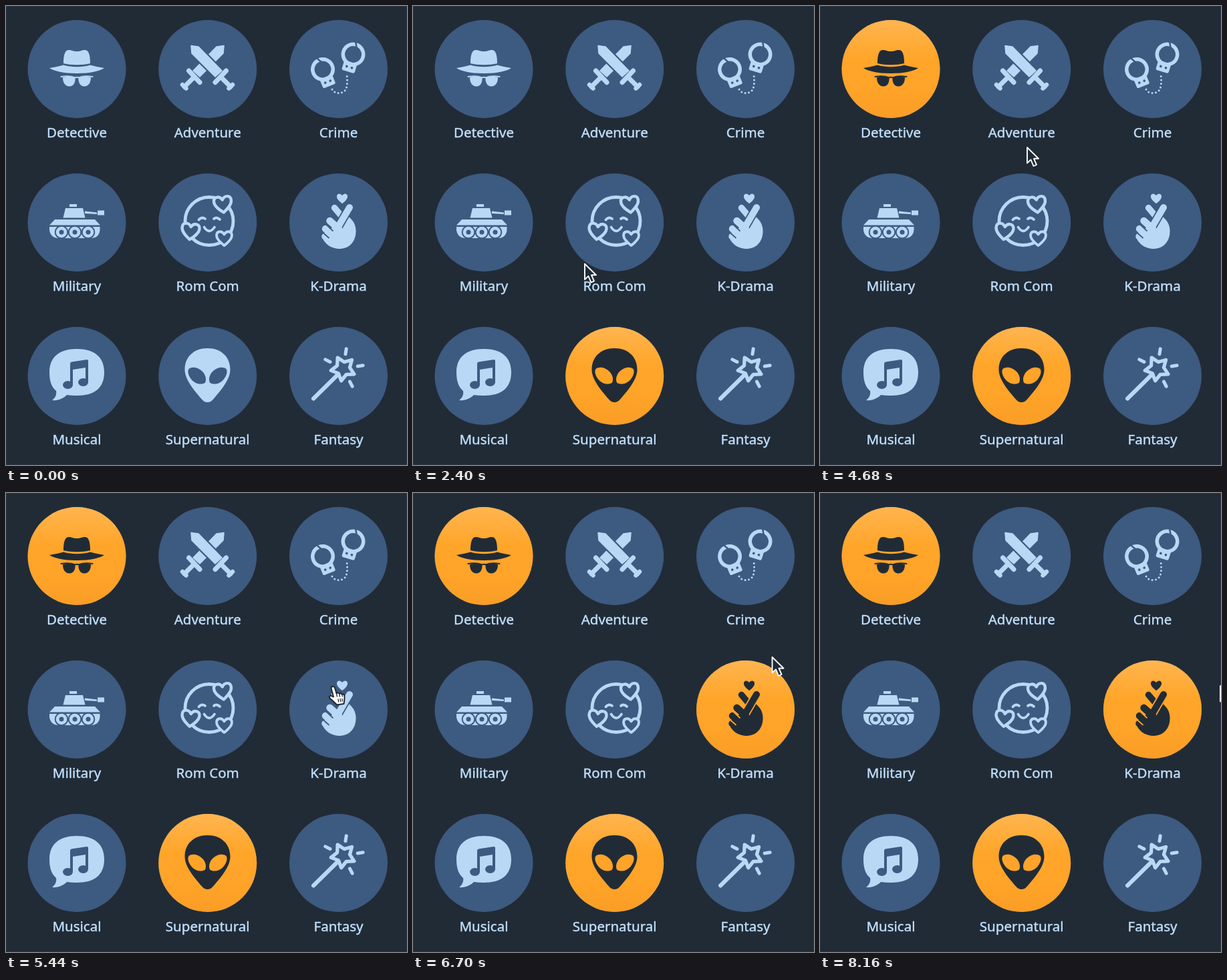
Recreate the animation shown at these times as an HTML page. Size 600 by 688 pixels, loop 8340 ms.

```html
<!DOCTYPE html>
<html lang="en">
<head>
<meta charset="utf-8">
<title>Genre picker</title>
<style>
  html, body { margin: 0; width: 100%; height: 100%; overflow: hidden; background: #212b36; }
  svg { display: block; }
  text { font: 20.5px "Noto Sans", "Open Sans", sans-serif; fill: #c1e0fd; stroke: #c1e0fd; stroke-width: .4; text-anchor: middle; }
  .idle { color: #b9d8f5; --gap: #3d5a80; }
  .picked { color: #212b36; --gap: #ffa428; }
  .ink { fill: currentColor; }
  .gap { fill: var(--gap); }
  .line { fill: none; stroke: currentColor; stroke-linecap: round; stroke-linejoin: round; }
  .cut { fill: none; stroke: var(--gap); stroke-linecap: round; stroke-linejoin: round; }
</style>
</head>
<body>
<svg id="stage" width="600" height="688" viewBox="0 0 600 688">
  <defs>
    <linearGradient id="amber" x2="0" y2="1">
      <stop offset="0" stop-color="#ffb54f"/>
      <stop offset=".4" stop-color="#ffa529"/>
      <stop offset=".7" stop-color="#ffa428"/>
      <stop offset="1" stop-color="#f99d26"/>
    </linearGradient>
    <path id="heart" d="M0 12 C-5 8 -13 2 -13 -5 C-13 -13 -4 -14 0 -7 C4 -14 13 -13 13 -5 C13 2 5 8 0 12Z"/>

    <g id="detective" class="ink">
      <path d="M86 86 C86 77 87 67 93 66 C98 65.500 100 68 106 68 C112 68 114 65.500 119 66 C125 67 126 77 126 86 C114 89 98 89 86 86Z"/>
      <path d="M65 93 C72 91.500 80 90.500 86 88.500 C98 92 114 92 126 88.500 C132 90.500 140 91.500 147 93 C140 97.500 126 101 106 101 C86 101 72 97.500 65 93Z"/>
      <path d="M85 107 C90 105.500 98 105.500 103.500 108 C104 115 100.500 120.500 95 120.500 C88.500 120.500 85 115 85 107Z"/>
      <path d="M127 107 C122 105.500 114 105.500 108.500 108 C108 115 111.500 120.500 117 120.500 C123.500 120.500 127 115 127 107Z"/>
      <path class="line" stroke-width="2" d="M82.500 106 Q95 104 103.500 107.500 Q106 106 108.500 107.500 Q117 104 129.500 106"/>
    </g>

    <g id="sword">
      <path d="M277 59.5 L288 61 L323 97 L313 106 L278 71Z" class="ink line" style="fill:currentColor" stroke-width="1.500"/>
      <path class="line" stroke-width="7" d="M329.5 97 L313 114.5 M321 106 L336 121"/>
      <path class="line" stroke-width="6.5" d="M339 118 L333.5 123.5"/>
    </g>
    <g id="adventure">
      <use href="#sword" transform="matrix(-1 0 0 1 603 0)"/>
      <path class="cut" stroke-width="6" d="M277 59.5 L288 61 L323 97 L313 106 L278 71Z"/>
      <use href="#sword"/>
    </g>

    <g id="cuff">
      <circle class="line" r="15.200" stroke-width="5.500"/>
      <rect class="ink" x="-10" y="12" width="20" height="15" rx="2.5"/>
      <circle class="gap" cx="-4" cy="20" r="1.8"/>
      <circle class="gap" cx="4" cy="20" r="1.8"/>
      <path class="cut" stroke-width="2.5" stroke-linecap="butt" d="M-2 -19 L2 -11"/>
    </g>
    <g id="crime">
      <use href="#cuff" transform="translate(474 95) rotate(-22)"/>
      <use href="#cuff" transform="translate(519.5 72.5) rotate(17)"/>
      <path class="line" stroke-width="3" stroke-dasharray="0 5.5" d="M488 125 C491 131 501 133 507 127 C511 122 511 112 510 104"/>
    </g>

    <g id="military">
      <path class="ink" d="M95 297H106V301H95Z M89 303H115L118.500 317.500H85.500Z M118 307.500L136 309.500V312L118 311Z M137 306.500H147V313.500H137Z M73 320H133L141 328.500H65Z"/>
      <path class="ink" d="M65 331H140.500V336Q139 348 127 348H79Q67 348 65 336Z"/>
      <g id="wheel">
        <circle class="gap" cx="83" cy="339" r="10.300"/>
        <circle class="ink" cx="83" cy="339" r="8.300"/>
        <circle class="gap" cx="83" cy="339" r="3.500"/>
      </g>
      <use href="#wheel" x="20"/>
      <use href="#wheel" x="40"/>
    </g>

    <g id="romcom">
      <g class="line" stroke-width="4.800">
        <circle cx="304" cy="322.500" r="36"/>
        <path stroke-width="3.800" d="M288.500 320.500 Q293 315.500 298 319 M311 319 Q315 315.500 320 320 M296.500 331.500 Q304 343 312 331.500"/>
        <g class="gap" stroke-width="4.4">
          <use href="#heart" transform="translate(324.500 297.500) rotate(-6)"/>
          <use href="#heart" transform="translate(276 338) rotate(6)"/>
          <use href="#heart" transform="translate(326.500 348.500) scale(.88)"/>
        </g>
      </g>
    </g>

    <g id="kdrama">
      <use href="#heart" class="ink" transform="translate(503 288.700) scale(.62)"/>
      <path class="line" stroke-width="9.500" d="M491.500 302.500 L514 329"/>
      <path class="ink" d="M494 326 L513 316 C520 322 524 329 523.500 339 C523 354 513 364 499 364 C489 363.500 481 360 475 351 L478 342Z"/>
      <path class="cut" stroke-width="13.500" d="M514 302 L497 331"/>
      <path class="line" stroke-width="10" d="M514 302 L497 331"/>
      <path class="line" stroke-width="10.500" d="M484.500 322 L498 334 M478 334 L491 346 M477.500 345.500 L488 354"/>
      <path class="cut" stroke-width="1.800" d="M479 327.500 L489 337 M474.500 340 L483 347.500"/>
    </g>

    <g id="musical">
      <path class="ink" d="M106 514 C132 514 147 526 147 549 C147 573 132 584 106 584 Q98 584 91 583 C86 588 78 592 69 591 C74 587 76 582 75 577 C68 571 65 562 65 549 C65 526 80 514 106 514Z"/>
      <g class="gap">
        <path d="M96 536 Q96 534 98 533.500 L121 530 Q123 530 123 532 V564 H119 V542 L100 545 V568 H96Z"/>
        <ellipse cx="92.500" cy="568" rx="7.500" ry="6"/>
        <ellipse cx="115.500" cy="564" rx="7.500" ry="6"/>
      </g>
    </g>

    <g id="supernatural">
      <path class="ink" d="M301.500 513 C322 513 335.500 526 335.500 545 C335.500 561 319 579 310 589.500 C305 595.500 298 595.500 293 589.500 C284 579 267.500 561 267.500 545 C267.500 526 281 513 301.500 513Z"/>
      <path id="eye" class="gap" d="M273.500 544 C279 539.500 289 542 295 549 C299 554 300 560 298 564.500 C293 568.500 283 566.500 278 560.500 C273 554.500 271 548 273.500 544Z"/>
      <use href="#eye" transform="matrix(-1 0 0 1 603 0)"/>
    </g>

    <g id="fantasy" class="line">
      <path stroke-width="6" d="M460 588.500 L497 552"/>
      <path id="star" stroke-width="5.200"/>
      <path id="rays" stroke-width="5"/>
    </g>

    <path id="arrow" d="M0 0 V23.500 L5.400 18.400 L9.500 28 L14 26 L10 16.800 H17Z"
      fill="#212b36" stroke="#fff" stroke-width="1.900" stroke-linejoin="round"/>
    <g id="hand" stroke="#202832" stroke-linejoin="round" stroke-linecap="round">
      <path fill="#fff" stroke-width="2" d="M-2.500 1.500 C-2.500 -1.800 2 -1.800 3 1 L5.500 9.500 C7 8 9 8 9.700 10 C11 8.500 13 9 13.800 11 C15.500 10 17.200 11 17.500 13.500 C18 18 17 21 16.500 25 L6 26.500 C3 23 -1 20 -4 17 C-6.500 14.500 -4 11.500 -1 13.500 L1 14.500Z"/>
      <path fill="none" stroke-width="1.300" d="M5.500 9.500 L6.500 14 M9.700 10 L10.500 14 M13.800 11 L14.300 14 M8 18 L8.700 22 M11 17.500 L11.700 21.500 M14 17.500 L14.300 21"/>
    </g>
  </defs>
  <rect x=".5" y=".5" width="599" height="687" fill="#212b36" stroke="#293644"/>
  <g id="tiles"></g>
  <g id="cursor"><use id="pointer" href="#hand"/><use id="plain" href="#arrow"/></g>
</svg>
<script>
const LOOP = 8340, LAST_STEP = 8160, FADE = 120, RADIUS = 73.5;
const columns = [106, 301.7, 497.5], rows = [94.5, 324.5, 554.5];
const labels = ["Detective", "Adventure", "Crime", "Military", "Rom Com", "K-Drama", "Musical", "Supernatural", "Fantasy"];
const clicks = { Supernatural: 1240, Detective: 3740, "K-Drama": 5760 };

// Cursor stops and waypoints: time, x, y
const path = [
  [0, 372, 718], [940, 339, 581], [1800, 339, 581], [3160, 140, 109],
  [4160, 140, 109], [4680, 310, 212], [5300, 489, 291], [6220, 489, 291],
  [6700, 537.5, 246], [7440, 599, 286], [8160, 599, 289]
];

const byId = id => document.getElementById(id);
const clamp = v => Math.max(0, Math.min(1, v));

// The star and its rays are symmetric about the wand
function starPoint(radius, degrees) {
  const a = degrees * Math.PI / 180;
  return `${504.5 + radius * Math.cos(a)} ${543.5 + radius * Math.sin(a)}`;
}
byId("star").setAttribute("d", "M" + Array.from({ length: 10 }, (_, i) =>
  starPoint(i % 2 ? 10 : 18.5, i * 36 - 45)).join("L") + "Z");
byId("rays").setAttribute("d", [-153, -81, -9, 63].map(a =>
  `M${starPoint(22, a)}L${starPoint(30, a)}`).join(""));

const tiles = labels.map((label, i) => ({ label, x: columns[i % 3], y: rows[Math.floor(i / 3)] }));

function face({ label, x, y }, state, fill) {
  const icon = label.toLowerCase().replace(/[^a-z]/g, "");
  return `<g class="${state}"><circle cx="${x}" cy="${y}" r="${RADIUS}" fill="${fill}"/><use href="#${icon}"/></g>`;
}

byId("tiles").innerHTML = tiles.map(tile =>
  face(tile, "idle", "#3d5a80") +
  (clicks[tile.label] ? face(tile, "picked", "url(#amber)") : "") +
  `<text x="${tile.x}" y="${tile.y + 102.5}">${tile.label}</text>`).join("");

const picked = [...document.querySelectorAll(".picked")];
const pickTimes = tiles.map(tile => clicks[tile.label]).filter(Boolean);

function slope(i, axis) {
  const before = path[i - 1], here = path[i], after = path[i + 1];
  const rests = !before || !after || [before, after].some(p => p[1] === here[1] && p[2] === here[2]);
  return rests ? 0 : (after[axis] - before[axis]) / (after[0] - before[0]);
}

// Cubic Hermite curve that comes to rest at repeated points
function cursorAt(t) {
  const i = Math.max(0, path.findIndex(p => p[0] >= t) - 1);
  const a = path[i], b = path[i + 1], span = b[0] - a[0], u = (t - a[0]) / span;
  return [1, 2].map(axis => {
    const ease = u * u * (3 - 2 * u);
    return a[axis] + (b[axis] - a[axis]) * ease +
      span * u * (1 - u) * ((1 - u) * slope(i, axis) - u * slope(i + 1, axis));
  });
}

function draw(time) {
  const t = Math.min(Math.floor(time % LOOP / 20) * 20, LAST_STEP);
  const [x, y] = cursorAt(t);
  const hovering = tiles.some(tile => Math.hypot(x - tile.x, y - tile.y) < RADIUS);
  byId("cursor").setAttribute("transform", `translate(${x} ${y})`);
  byId("pointer").setAttribute("visibility", hovering ? "visible" : "hidden");
  byId("plain").setAttribute("visibility", hovering ? "hidden" : "visible");
  picked.forEach((el, i) => el.setAttribute("opacity", clamp((t - pickTimes[i]) / FADE)));
}

const start = performance.now();
function tick() {
  draw(performance.now() - start);
  requestAnimationFrame(tick);
}
tick();
</script>
</body>
</html>
```
